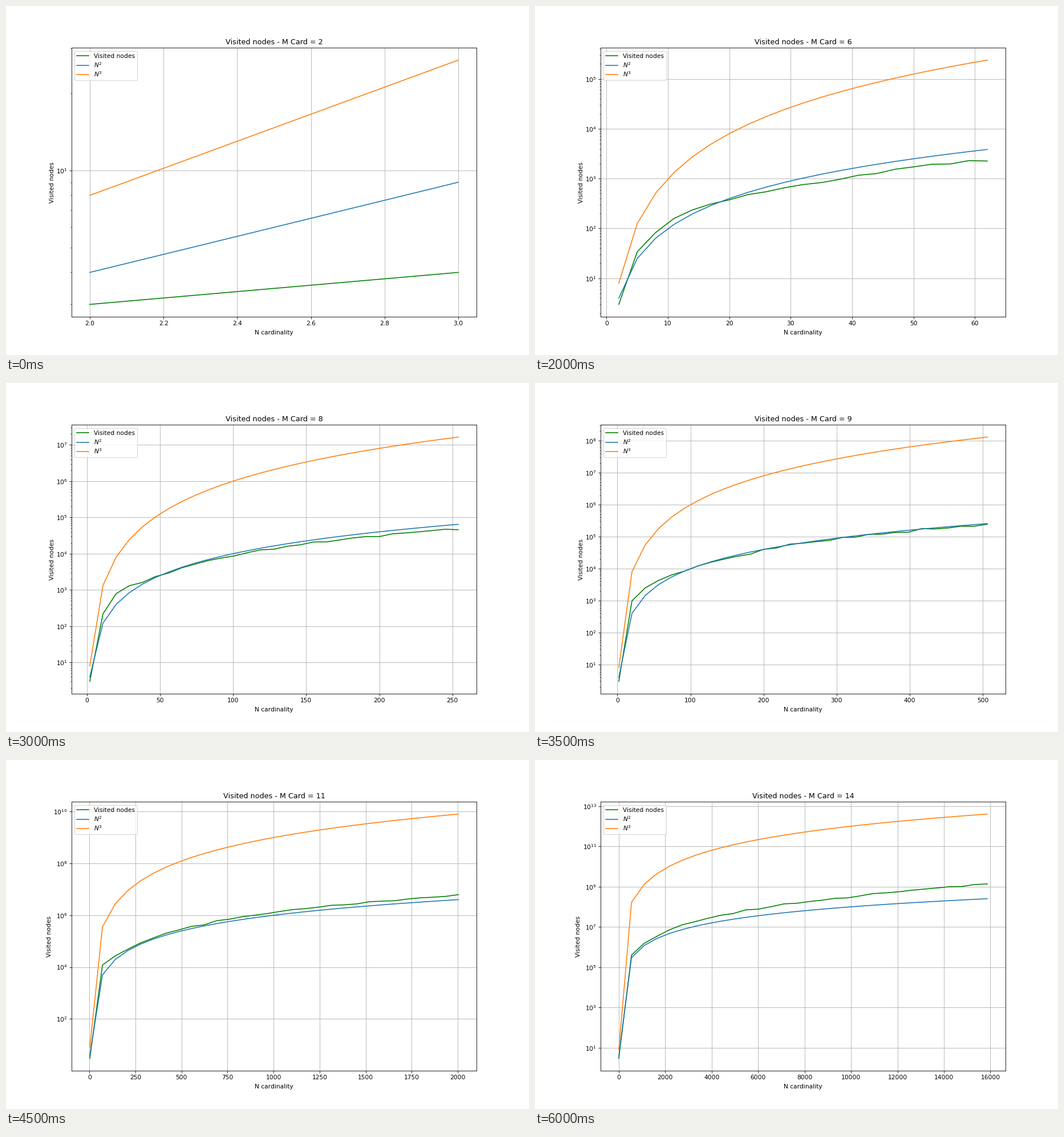
A matplotlib script for the animation above (6.5 s loop, 917 by 611 pixels).

```python
import numpy as np
import matplotlib.pyplot as plt
from matplotlib.animation import FuncAnimation

DPI = 76.375
FIRST_M, LAST_M = 2, 14


def sizes(m):
    """About thirty evenly spaced N values below 2**m."""
    return np.arange(2, 2 ** m, 2 ** m // 30 + 1, dtype=float)


def visited(m):
    """Nodes visited for each N: close to N^2, with a trend set by m."""
    n = sizes(m)
    t = np.linspace(0, 1, len(n))
    start = 0.024 * m - 0.24
    slope = 0.78 * (max(m - 4, 0) / 10) ** 2.7 - 0.13
    # Extra work while N is near the square root of 2**m
    bump = np.clip(0.065 * m - 0.12, 0, 0.42)
    bump = bump * np.exp(-(np.log2(n) - m / 2) ** 2 / 1.6)
    noise = np.random.default_rng(m).normal(0, 0.02, len(n))
    count = np.round(n ** 2 * 10 ** (start + slope * t + bump + noise))
    count[0] = 3
    return count


fig, ax = plt.subplots(figsize=(917 / DPI, 611 / DPI), dpi=DPI)


def draw(frame):
    m = FIRST_M + frame
    n = sizes(m)
    ax.clear()
    ax.plot(n, visited(m), color="green", label="Visited nodes")
    ax.plot(n, n ** 2, color="C0", label="$N^2$")
    ax.plot(n, n ** 3, color="C1", label="$N^3$")
    ax.set_yscale("log")
    ax.tick_params(axis="y", pad=2.8)
    ax.set_title(f"Visited nodes - M Card = {m}")
    ax.set_xlabel("N cardinality", labelpad=5)
    ax.set_ylabel("Visited nodes", labelpad=2)
    ax.grid(True)
    ax.legend(loc="upper left", labelspacing=0.27)
    return ax.get_children()


anim = FuncAnimation(fig, draw, frames=LAST_M - FIRST_M + 1, interval=500,
                     repeat=True, repeat_delay=0, blit=False)
plt.show()
```
